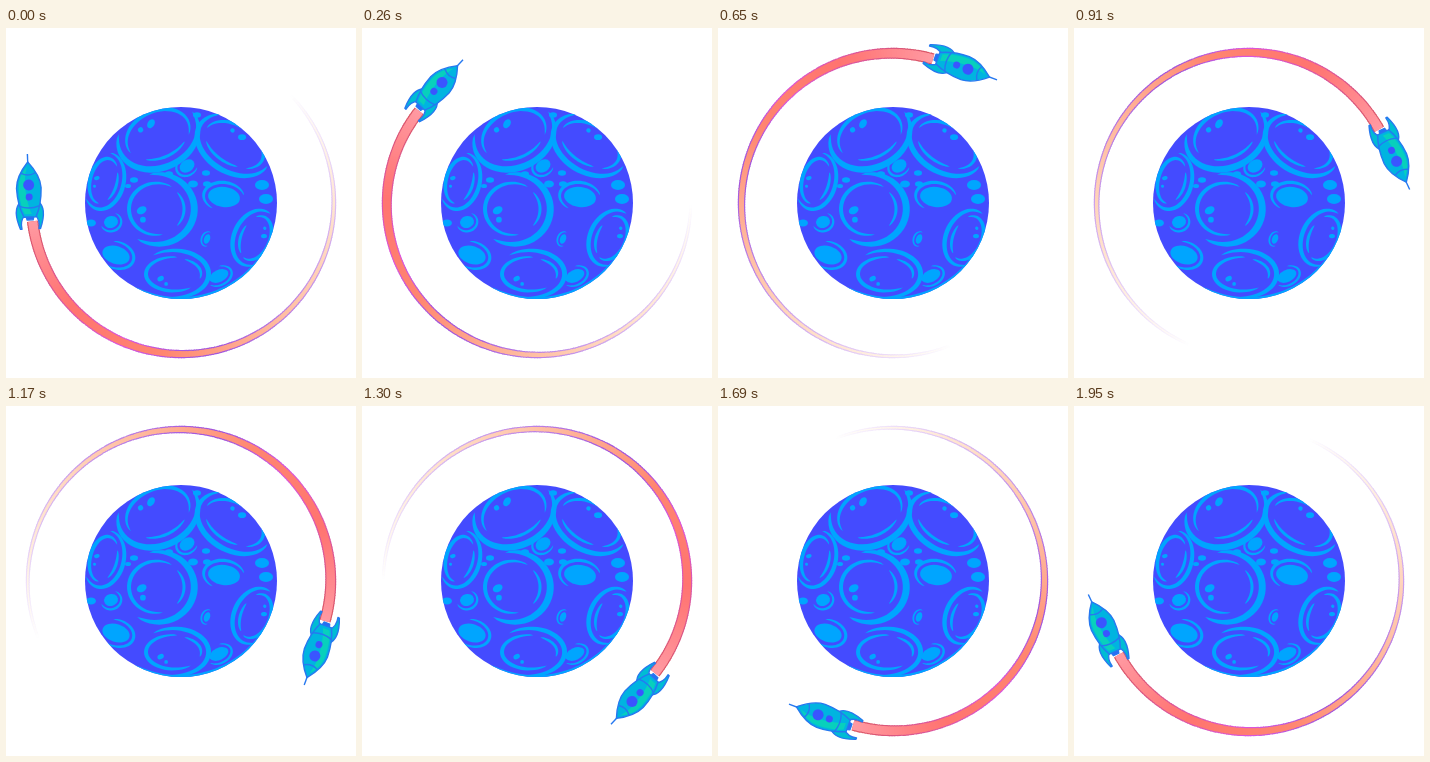
An HTML page with a canvas that plays this animation: 350x350 px, repeating every 2080 ms.

```html
<!DOCTYPE html>
<html lang="en">
<head>
<meta charset="utf-8">
<title>Rocket in orbit</title>
<style>
  html, body { margin: 0; height: 100%; overflow: hidden; background: #fff; }
  canvas { display: block; width: 350px; height: 350px; }
</style>
</head>
<body>
<canvas id="stage" width="350" height="350"></canvas>
<script>
const ctx = document.getElementById('stage').getContext('2d');
const STEP_MS = 130, STEPS = 16, CENTER = 175;
const TRAIL_RADIUS = 155.2, TRAIL_HEAD = 173, TRAIL_SPAN = 217;
const rad = deg => deg * Math.PI / 180;

// Runs paint() in a moved and turned coordinate system
function at(x, y, deg, paint) {
  ctx.save();
  ctx.translate(x, y);
  ctx.rotate(rad(deg));
  paint();
  ctx.restore();
}

function blob(x, y, rx, ry = rx, rot = 0) {
  ctx.beginPath();
  ctx.ellipse(x, y, rx, ry, rad(rot), 0, 7);
  ctx.fill();
}

// Brush stroke with tapered ends, centred on the direction mid
function crescent(rx, ry, mid, half, width) {
  const n = 32;
  ctx.beginPath();
  for (let i = 0; i <= 2 * n; i++) {
    const t = 1 - Math.abs(i - n) / n;
    const a = rad(mid + half * (2 * t - 1));
    const d = Math.sign(n - i) * width / 2 * Math.sqrt(Math.sin(Math.PI * t));
    ctx.lineTo((rx + d) * Math.cos(a), (ry + d) * Math.sin(a));
  }
  ctx.fill();
}

// A raised rim lies towards face; wide craters get an inner ring and glints
function crater(x, y, rx, ry, rot, face) {
  const small = Math.min(rx, ry), gap = 1.5 + 0.3 * small;
  at(x, y, rot, () => {
    crescent(rx + gap, ry + gap, face, 112, gap * 0.75);
    if (Math.max(rx, ry) < 20) return blob(0, 0, rx, ry);
    crescent(rx, ry, face + 180, 112, 4);
    crescent(rx - 1, ry - 1, face - 10, 42, 3);
    const a = rad(face + 165);
    blob(rx * 0.55 * Math.cos(a), ry * 0.55 * Math.sin(a), small * 0.2, small * 0.14, -30);
    blob(rx * 0.65 * Math.cos(a - 0.6), ry * 0.65 * Math.sin(a - 0.6), small * 0.11);
  });
}

function drawPlanet() {
  ctx.save();
  ctx.beginPath();
  ctx.arc(CENTER, CENTER, 96, 0, 7);
  ctx.fillStyle = '#444bff';
  ctx.fill();
  ctx.clip();
  ctx.fillStyle = '#00a5ff';

  crater(152, 107, 33, 24, -25, 100);
  crater(228, 117, 32, 20, 30, 115);
  crater(98, 153, 14, 23, 14, 20);
  crater(151, 181, 28, 26, 0, 10);
  crater(249, 210, 15, 23, 24, 170);
  crater(168, 246, 28, 17, 0, -15);
  crater(110, 227, 14, 9, 18, 0);
  crater(218, 169, 16, 10, 8, -130);
  crater(181, 138, 8, 6, -35, 160);
  crater(213, 248, 10, 6, -25, 40);
  crater(201, 211, 3, 5, 20, 170);
  crater(105, 194, 7, 6, -15, 60);

  const pebbles = [[256, 157, 7], [260, 171, 7], [187, 156, 5], [200, 145, 4], [201, 156, 4],
    [163, 146, 4], [128, 152, 4], [122, 158, 3], [191, 87, 4], [85, 195, 5]];
  for (const [x, y, r] of pebbles) blob(x, y, r, r * 0.7);

  at(CENTER, CENTER, 0, () => crescent(96, 96, 74, 45, 4));
  ctx.restore();
}

// Colour shifts from red to purple (edge) or orange (core), then fades to white
function trailColor(t, isCore) {
  const fade = from => Math.max(0, (t - from) / (1 - from));
  return isCore
    ? `hsl(${355 + 40 * t} 100% ${72 + 28 * fade(0.35) + 8 * Math.max(0, 1 - 6 * t)}%)`
    : `hsl(${355 - 80 * Math.min(1, 2.5 * t)} 65% ${60 + 40 * fade(0.45)}%)`;
}

function drawTrail() {
  for (const isCore of [false, true]) {
    for (let u = 0; u < TRAIL_SPAN; u++) {
      const t = u / TRAIL_SPAN, width = 11.5 - 8.5 * t, a = TRAIL_HEAD - u;
      ctx.strokeStyle = trailColor(t, isCore);
      ctx.lineWidth = isCore ? width - 2.4 : width;
      ctx.beginPath();
      ctx.arc(CENTER, CENTER, TRAIL_RADIUS - width / 2, rad(a - 1.3), rad(a));
      ctx.stroke();
    }
  }
}

function shape(d, fill) {
  const path = new Path2D(d);
  ctx.fillStyle = fill;
  ctx.fill(path);
  ctx.stroke(path);
}

function drawRocket() {
  ctx.strokeStyle = '#2678f0';
  ctx.lineWidth = 1.4;
  ctx.lineJoin = 'round';
  shape('M-4 28H4L3 32H-3Z', '#2a6cf5');
  for (const side of [-1, 1]) {
    ctx.save();
    ctx.scale(side, 1);
    shape('M9 14C15 19 15 28 10 41H8.5C10 34 8 30 5 27Z', '#00bcd4');
    ctx.restore();
  }
  shape('M0 -34V-23', '#2678f0');
  shape('M0 -26C6 -19 12 -9 12.3 0C12 13 9 23 6 29H-6C-9 23 -12 13 -12.3 0C-12 -9 -6 -19 0 -26Z', '#00b4e0');
  ctx.fillStyle = '#08d0bc';
  ctx.fill(new Path2D('M-1 -21C-7 -15 -10 -8 -10 0C-10 10 -8 20 -5 26H2C-3 15 -6 -8 -1 -21Z'));
  ctx.fillStyle = '#3a55ff';
  blob(0, -3, 5.5);
  blob(0, 9, 3.5);
  for (const [y, w] of [[-15, 7], [18, 10]]) {
    ctx.stroke(new Path2D(`M${-w} ${y}Q0 ${y + 4} ${w} ${y}`));
  }
}

function draw(step) {
  ctx.clearRect(0, 0, 350, 350);
  drawPlanet();
  at(CENTER, CENTER, step * 360 / STEPS, () => {
    ctx.translate(-CENTER, -CENTER);
    drawTrail();
    at(22.8, 160, -2.4, drawRocket);
  });
}

let shown = -1;
const start = performance.now();
function tick() {
  const step = Math.floor((performance.now() - start) / STEP_MS) % STEPS;
  if (step !== shown) draw(shown = step);
  requestAnimationFrame(tick);
}
tick();
</script>
</body>
</html>
```
